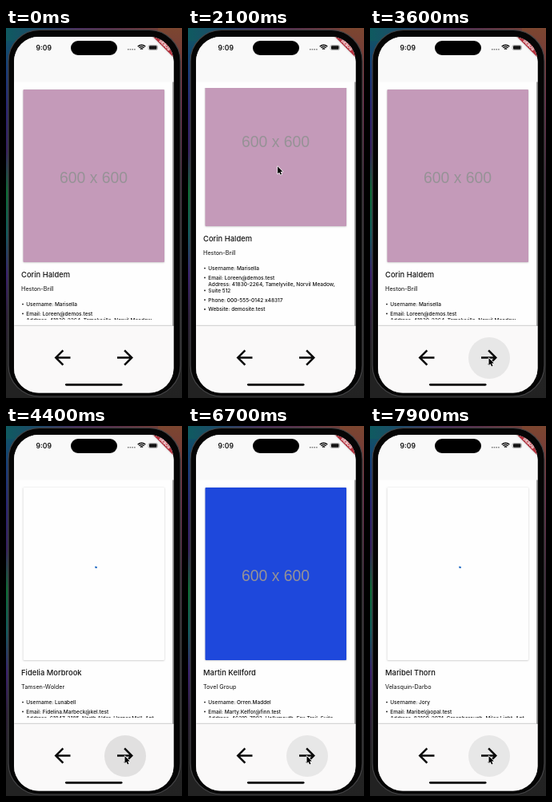
An HTML page with a canvas that plays this animation: 220x463 px, repeating every 8000 ms.

```html
<!DOCTYPE html>
<html lang="en">
<head>
<meta charset="utf-8">
<title>Profile browser</title>
<style>
  html, body { margin: 0; width: 100%; height: 100%; overflow: hidden; background: #111; }
  canvas { display: block; width: 220px; height: 463px; }
</style>
</head>
<body>
<canvas id="stage"></canvas>
<script>
const W = 220, H = 463, LOOP = 8000, STEP = 100;
const canvas = document.getElementById('stage');
const ctx = canvas.getContext('2d');
const ratio = window.devicePixelRatio || 1;
canvas.width = W * ratio;
canvas.height = H * ratio;

const person = (name, company, user, email, address, color) =>
  ({ name, company, user, email, address, color });

const people = [
  person('Corin Haldem', 'Heston-Brill', 'Marisella', 'Loreen@demos.test',
    '41830-2264, Tamelyville, Norvil Meadow,', '#c49ab9'),
  person('Fernanda Holst', 'Talbrook-Minsel', 'Sorelle', 'Fernanda@pebble.test',
    '70318-4452, Maddenfurt, Dolby Ridge, Suite', '#5fae9b'),
  person('Fidelia Morbrook', 'Tamsen-Wolder', 'Lunabell', 'Fidelina.Marbeck@kel.test',
    '61947-3185, North Alder, Harper Mall, Apt.', '#d8a06a'),
  person('Kestrel Damson', 'Wexbury LLC', 'Kes_Darrow', 'Kestrel_Moor@anvil.test',
    '28463-5170, Rosslyview, Skyler Walk, Suite', '#8fb6d8'),
  person('Mrs. Hollis Brandwen', 'Farrowell-Dunmere', 'Cornelio_Banwick', 'Maribel_Tovs@quill.test',
    '37150-8264, South Linden, Norbrook', '#a9c47c'),
  person('Martin Kellford', 'Tovel Group', 'Orren.Maddel', 'Marty.Kelfor@finn.test',
    '46210-7093, Hollymouth, Fox Trail, Suite', '#1e48dc'),
  person('Nestor Valdemoor', 'Abernell Group', 'Maxim_Nord', 'Sherwin@roselle.test',
    '45109-3362, Alyaview, Elswin Road, Suite', '#bb7f92'),
  person('Glenda Rosmer', 'Yostrel and Sons', 'Delphia', 'Chaimer_Dodd@dana.test',
    '76495-3109, Bartelside, Dayna Park, Suite', '#74a9b5'),
  person('Clementa Dorvale', 'Hoegner LLC', 'Morian.Stan', 'Reymond@karin.test',
    '31428-2261, Lebsville, Katrin Turn, Suite', '#9b87c4'),
  person('Maribel Thorn', 'Velasquin-Darbo', 'Jory', 'Maribel@opal.test',
    '83160-2974, Greenborough, Miles Light, Apt.', '#92b96c')
];

// start time, person, time at which the picture has loaded
const views = [
  [0, 0, 0], [3700, 1, 3900], [4400, 2, 4500], [4900, 3, 5000], [5400, 4, 6000],
  [6100, 5, 6200], [6800, 6, 6900], [7100, 7, 7200], [7400, 8, 7600], [7900, 9, 9000]
];
const presses = [3600, 4300, 5300, 6000, 6700, 7000, 7300, 7900];
const splash = [[0, .75], [100, 1], [200, 0]];

const scrollKeys = [[800, 0], [1500, 96.5], [1600, 96.5], [1950, 45], [2150, 45], [2700, -23], [2800, -23], [3050, 0]];
const cursorX = [[400, 150], [800, 114], [1500, 115], [2150, 112], [2700, 111], [2850, 111], [3300, 148.5]];
const cursorY = [[400, 414], [800, 288], [1500, 150], [1700, 150], [2150, 174], [2700, 268], [2850, 268], [3300, 413]];

function keyed(keys, t) {
  if (t <= keys[0][0]) return keys[0][1];
  for (let i = 1; i < keys.length; i++) {
    const [t0, a] = keys[i - 1], [t1, b] = keys[i];
    if (t <= t1) {
      const p = (t - t0) / (t1 - t0);
      return a + (b - a) * p * p * (3 - 2 * p);
    }
  }
  return keys[keys.length - 1][1];
}

function rounded(x, y, w, h, r) {
  ctx.beginPath();
  ctx.roundRect(x, y, w, h, r);
}

function rect(x, y, w, h, color) {
  ctx.fillStyle = color;
  ctx.fillRect(x, y, w, h);
}

function text(str, x, y, size, weight = 400, color = '#111', align = 'left', family = 'Inter, sans-serif') {
  ctx.font = `${weight} ${size}px ${family}`;
  ctx.textAlign = align;
  ctx.textBaseline = 'alphabetic';
  ctx.fillStyle = color;
  ctx.fillText(str, x, y);
}

function gradient(x0, y0, x1, y1, colors) {
  const g = ctx.createLinearGradient(x0, y0, x1, y1);
  colors.forEach((c, i) => g.addColorStop(i / (colors.length - 1), c));
  return g;
}

function drawDesktop() {
  rect(0, 0, W, H, '#222');
  rect(0, 0, 30, H, gradient(0, 0, 0, H,
    ['#0f5a60', '#173c78', '#2a2470', '#35205c', '#0d6a34', '#125a5c', '#38206a', '#2a1d36', '#222', '#222']));
  rect(0, 0, W, 16, gradient(0, 0, W, 0, ['#0f5a60', '#20486a', '#4a3060', '#56304c', '#6a3a3c', '#7c4630']));
  rect(190, 0, 30, H, gradient(0, 0, 0, H, ['#7c4630', '#6a2c48', '#3c2436', '#2a2a2a', '#262626', '#222']));
}

function drawBody() {
  rounded(3, 2.5, 215, 458.5, 39);
  ctx.fillStyle = '#050505';
  ctx.fill();
  ctx.strokeStyle = '#444446';
  ctx.lineWidth = 1.2;
  ctx.stroke();
}

function drawStatus() {
  rounded(81, 16, 58, 18, 9);
  ctx.fillStyle = '#000';
  ctx.fill();
  text('9:09', 47.3, 27.8, 8.6, 600, '#111', 'center');
  for (let i = 0; i < 4; i++) rect(152 + i * 2.7, 26, 1.5, 1.5, '#777');

  ctx.strokeStyle = '#111';
  ctx.lineWidth = 1.5;
  for (const r of [2.2, 4.5, 6.8]) {
    ctx.beginPath();
    ctx.arc(169.5, 28, r, -Math.PI * .75, -Math.PI * .25);
    ctx.stroke();
  }
  rounded(178, 21.5, 11.5, 6, 1.8);
  ctx.lineWidth = .6;
  ctx.strokeStyle = '#888';
  ctx.stroke();
  rounded(179, 22.3, 9.5, 4.4, 1);
  ctx.fillStyle = '#111';
  ctx.fill();
}

function drawBanner() {
  ctx.save();
  ctx.translate(209, 11);
  ctx.rotate(Math.PI / 4);
  ctx.shadowColor = 'rgba(0,0,0,.4)';
  ctx.shadowBlur = 2 * ratio;
  rect(-22, 11, 44, 6.8, '#b5303c');
  ctx.shadowColor = 'transparent';
  text('DEBUG', 0, 16.5, 5, 800, '#fff', 'center');
  ctx.restore();
}

function drawSpinner(age) {
  const p = (age % 1333) / 1333;
  const sweep = .3 + 4.2 * Math.sin(Math.PI * p) ** 2;
  const start = -Math.PI / 2 + .15 + p * 5;
  ctx.beginPath();
  ctx.arc(110, 185, 8.5, start, start + sweep);
  ctx.strokeStyle = '#1c68c4';
  ctx.lineWidth = 2;
  ctx.stroke();
}

function drawPicture(who, t, start, loaded) {
  ctx.save();
  ctx.shadowColor = 'rgba(0,0,0,.26)';
  ctx.shadowBlur = 2 * ratio;
  ctx.shadowOffsetY = .5 * ratio;
  rounded(21.5, 77, 176.5, 216, 1);
  ctx.fillStyle = t >= loaded ? who.color : '#fefefe';
  ctx.fill();
  ctx.restore();
  if (t >= loaded) {
    text('600 x 600', 109.5, 194, 19.4, 400, '#969296', 'center', '"Liberation Sans", Arial, sans-serif');
  } else if (loaded - t > 100 || t === start) {
    drawSpinner(t - start);
  }
}

function drawDetails(who) {
  text(who.name, 19, 311.5, 9.4, 500);
  text(who.company, 19, 328.6, 7.25);
  const rows = [
    [348, 'Username: ' + who.user, true],
    [359.8, 'Email: ' + who.email, true],
    [367.8, 'Address: ' + who.address, false],
    [375.8, 'Suite 512', true],
    [387.6, 'Phone: 000-555-0142 x48317', true],
    [399.4, 'Website: demosite.test', true]
  ];
  for (const [y, label, bullet] of rows) {
    text(label, 25.3, y, 6.5, 500);
    if (!bullet) continue;
    ctx.beginPath();
    ctx.arc(21, y - 2.4, .9, 0, Math.PI * 2);
    ctx.fill();
  }
}

function drawContent(t) {
  const [start, index, loaded] = views.filter(v => v[0] <= t).pop();
  ctx.save();
  ctx.beginPath();
  ctx.rect(12, 75, 196, 290);
  ctx.clip();
  ctx.translate(0, -keyed(scrollKeys, t));
  drawPicture(people[index], t, start, loaded);
  drawDetails(people[index]);
  ctx.restore();
}

const arrow = new Path2D('M12 4l-1.41 1.41L16.17 11H4v2h12.17l-5.58 5.59L12 20l8-8z');
function drawArrow(x, y, direction) {
  ctx.save();
  ctx.translate(x, y);
  ctx.scale(1.25 * direction, 1.25);
  ctx.translate(-12, -12);
  ctx.fillStyle = '#0a0a0a';
  ctx.fill(arrow);
  ctx.restore();
}

function drawFooter(t) {
  ctx.save();
  ctx.shadowColor = 'rgba(0,0,0,.5)';
  ctx.shadowBlur = 2 * ratio;
  rect(10, 373, 200, 86, '#faf9f9');
  ctx.restore();

  const press = presses.filter(p => p <= t).pop();
  const strength = press === undefined ? 0 : keyed(splash, t - press);
  if (strength > 0) {
    ctx.beginPath();
    ctx.arc(149, 413, 26, 0, Math.PI * 2);
    ctx.fillStyle = `rgba(0,0,0,${.1 * strength})`;
    ctx.fill();
  }
  drawArrow(70.5, 412.5, -1);
  drawArrow(149, 412.5, 1);
  rounded(74, 444.9, 71.5, 2.8, 1.4);
  ctx.fillStyle = '#000';
  ctx.fill();
}

const pointer = new Path2D('M0 0V9L2 7.2L3.5 10.4L5 9.7L3.6 6.6H6.4Z');
function drawCursor(t) {
  if (t < 400) return;
  ctx.save();
  ctx.translate(keyed(cursorX, t), keyed(cursorY, t));
  ctx.lineJoin = 'round';
  ctx.lineWidth = 1.4;
  ctx.strokeStyle = '#fff';
  ctx.stroke(pointer);
  ctx.fillStyle = '#000';
  ctx.fill(pointer);
  ctx.restore();
}

function draw(t) {
  ctx.setTransform(ratio, 0, 0, ratio, 0, 0);
  drawDesktop();
  drawBody();
  ctx.save();
  rounded(10, 11, 199.5, 445.5, 31);
  ctx.clip();
  rect(10, 11, 200, 446, '#fefefe');
  rect(10, 11, 200, 56.5, '#f9f9f9');
  rect(208, 67.5, 1, 305, '#a0a0a0');
  drawContent(t);
  drawFooter(t);
  drawStatus();
  drawBanner();
  ctx.restore();
  drawCursor(t);
}

const origin = performance.now();
function tick() {
  const t = (performance.now() - origin) % LOOP;
  draw(Math.floor(t / STEP) * STEP);
  requestAnimationFrame(tick);
}
tick();
</script>
</body>
</html>
```
